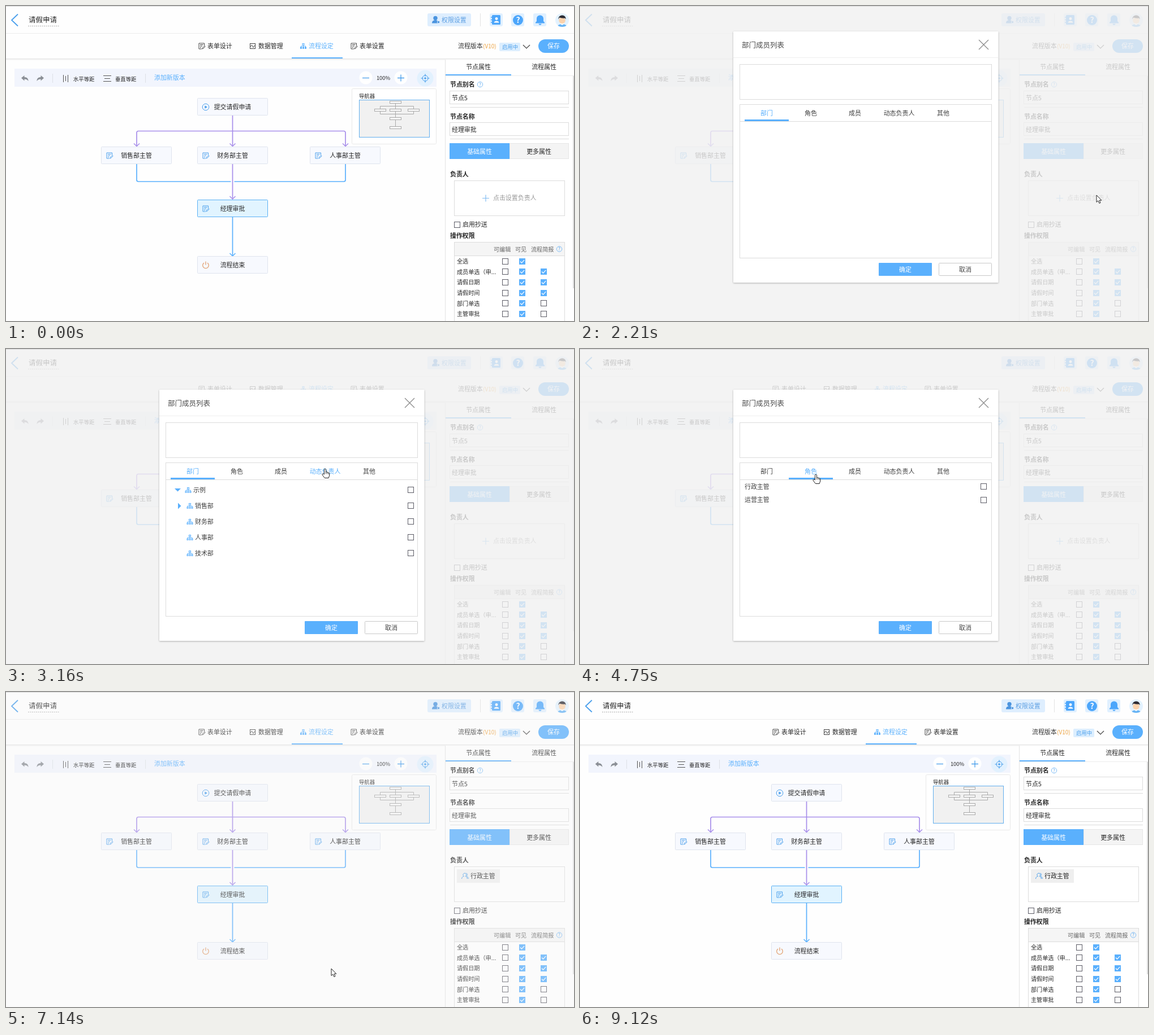
An HTML page for the animation above (9.69 s loop, 1004x558 px).

```html
<!DOCTYPE html>
<html lang="zh-CN">
<head>
<meta charset="utf-8">
<style>
  html, body { margin: 0; width: 100%; height: 100%; overflow: hidden; background: #fff; }
  svg { display: block; width: 1004px; height: 558px; font-family: 'Noto Sans CJK SC', 'Noto Sans CJK', 'Noto Sans', sans-serif; }
  #dialog { --ink: #404040; }
</style>
</head>
<body>
<svg id="stage" viewBox="0 0 1004 558" fill="none"></svg>
<script>
const BLUE = '#5ab0fd', DEEP = '#4a9fec', PURPLE = '#a78eea', INK = '#262626', SOFT = '#404040', EDGE = '#dcdcdc';
const LOOP = 9690, TICK = 79.2;

// ---- drawing helpers, each returns SVG markup ----
const text = (s, x, cy, { size = 10.95, fill = INK, mid = false, bold = false, id = '' } = {}) =>
  `<text x="${x}" y="${cy + size * .38}" font-size="${size}" fill="${fill}"${mid ? ' text-anchor="middle"' : ''}${bold ? ' font-weight="700"' : ''}${id && ` id="${id}"`}>${s}</text>`;
const rect = (x, y, w, h, fill = 'none', stroke = 'none', r = 0, extra = '') =>
  `<rect x="${x}" y="${y}" width="${w}" height="${h}" rx="${r}" fill="${fill}" stroke="${stroke}" ${extra}/>`;
const path = (d, stroke = BLUE, width = 1, fill = 'none') =>
  `<path d="${d}" stroke="${stroke}" stroke-width="${width}" fill="${fill}"/>`;
const fill = (d, color) => path(d, 'none', 0, color);
const circle = (x, y, r, color, stroke = 'none') => `<circle cx="${x}" cy="${y}" r="${r}" fill="${color}" stroke="${stroke}"/>`;
const group = (id, body) => `<g id="${id}">${body}</g>`;
const at = (x, y, body) => `<g transform="translate(${x} ${y})">${body}</g>`;

// Snapped to the pixel grid so that the borders stay sharp.
const checkbox = (cx, cy, on) => at(Math.floor(cx) + .5, Math.floor(cy) + .5, on
  ? rect(-5.5, -5.5, 11, 11, BLUE) + path('M-3.5 0L-1 2.7L3.7-2.7', '#fff', 1.2)
  : rect(-5, -5, 10, 10, '#fff', '#5c5c66'));
const help = (x, y) => circle(x, y, 4.7, 'none', '#7fbdf5') + text('?', x, y, { size: 7.5, fill: DEEP, mid: true });
const docIcon = (x, y, color = DEEP) => at(x, y, path('M4.5-1V-5H-5V5H0M-3-2.5H2.5M-3 0H1M-3 2.5H-1M1 5L1.5 3L5-.5L6 .8L2.5 4.5Z', color));
const orgIcon = (x, y, color = BLUE) => at(x, y,
  rect(-1.5, -4.5, 3, 2.5, 'none', color) + [-4, 0, 4].map(i => rect(i - 1, 2, 2, 2.3, 'none', color)).join('') + path('M0-2V2M-4 2V0H4V2', color, .9));
const peopleIcon = (x, y) => at(x, y, path('M-5.5 5C-5 1.5-3.5 .8-1.5 .5C-4.5-1.5-3-5 0-5C3-5 3.5-1.5 1 .5C3 1 4 2.5 4.3 5M2.5-5C5-4.5 5-1.5 3 .2C5 1 6 2.5 6.3 5', DEEP));

function header() {
  const square = x => rect(x, 13, 23, 23, '#e0f0ff', 'none', 3);
  return path('M0 .5H1004', '#dadada') + path('M0 48.5H1004', '#ececec')
    + path('M21 14.5L10 25L21 35.5', DEEP, 1.8)
    + text('请假申请', 40, 24, { size: 12.5 }) + `<path d="M39 35.5H95" stroke="#aaa" stroke-dasharray="2 1.5"/>`
    + rect(745, 13, 77, 23, '#deeefe', 'none', 3) + text('权限设置', 770, 25, { fill: '#5b9ee2' })
    + circle(759, 21.5, 3.7, '#4b94df') + fill('M753 30.5C753 25.5 757 25 759 25C762 25 764 26 764.5 30.5Z', '#4b94df') + circle(764.5, 28.5, 2.2, '#4b94df', '#deeefe')
    + path('M838.5 13V36', '#e2e2e2')
    + square(855) + rect(859, 16, 15, 17, '#4ca6fb', 'none', 1.5) + path('M857 20H860M857 24.5H860M857 29H860', '#4ca6fb', 1.5)
    + circle(867, 22.5, 2.4, '#fff') + fill('M862.5 29.5C863 25.5 871 25.5 871.5 29.5Z', '#fff')
    + square(893) + circle(905, 25, 9, '#4ca6fb') + text('?', 905, 24.8, { size: 14, fill: '#fff', mid: true, bold: true })
    + square(932) + fill('M936 30.5V29L938 27V22.5C938 18.5 941 16.5 944 16.5C947 16.5 950 18.5 950 22.5V27L952 29V30.5ZM941.5 31.5H946.5C946 34.5 942 34.5 941.5 31.5Z', '#4ca6fb')
    + circle(983, 25, 12, '#e3f2ff') + fill('M975.5 35C977 31 989 31 990.5 35C986 37.5 980 37.5 975.5 35Z', '#68b4f5')
    + fill('M980 29H986V32L983 34L980 32Z', '#fff') + circle(983, 25.5, 5.8, '#fbd3ad') + fill('M976.5 23.5C975.5 14.5 990.5 14 989.5 23.5L988 21.5C984 22 980 21 978 20.5Z', '#2c2c34');
}

function navigation() {
  return rect(0, 93, 1004, 1, '#e3e3e3') + rect(0, 94, 1004, 2, '#f4f4f4')
    + docIcon(346, 71, '#444') + text('表单设计', 356, 71)
    + at(436, 71, rect(-4.5, -4.5, 9, 9, 'none', '#444') + path('M-4 1L-1.5-2L1 2.5L4-1.5', '#444')) + text('数据管理', 446, 71)
    + orgIcon(525.5, 71) + text('流程设定', 535, 71, { fill: BLUE }) + rect(505, 91, 90, 2, BLUE)
    + docIcon(615, 71, '#444') + text('表单设置', 625, 71)
    + text('流程版本', 799, 71, { fill: '#333' }) + text('(V10)', 843, 71, { size: 10, fill: '#eca03c' })
    + rect(872, 65, 37, 15, '#dceefe', 'none', 2) + text('启用中', 877, 72.5, { size: 9.37, fill: DEEP })
    + path('M914 69L920 75L926 69', '#444', 1.2)
    + rect(941, 59, 54, 24, BLUE, 'none', 12) + text('保存', 968, 71, { fill: '#fff', mid: true });
}

function toolbar() {
  const arrow = 'M-1-2C4-2 6 1 6 5C4 2 2 1.5-1 1.5V4.5L-6.5-.5L-1-5Z';
  return rect(15, 111, 746, 32, '#f2f5fd')
    + at(33.5, 128, fill(arrow, '#8b8f96')) + `<g transform="translate(60.5 128) scale(-1 1)">${fill(arrow, '#8b8f96')}</g>`
    + path('M82.5 120V136M246.5 120V136', '#dde0e6')
    + path('M101.5 122V135M105.5 124V133M109.5 122V135', '#555') + text('水平等距', 119, 129, { size: 9.37 })
    + path('M172 123.5H186M174 128.5H184M172 133.5H186', '#555') + text('垂直等距', 193, 129, { size: 9.37 })
    + text('添加新版本', 262, 127, { fill: BLUE })
    + circle(636, 127, 11.5, '#fff') + path('M630 127.5H642', DEEP, 1.3)
    + text('100%', 667, 127.5, { size: 9.37, mid: true })
    + circle(698, 127, 11.5, '#fff') + path('M692 127.5H704M698 121.5V133.5', DEEP, 1.3)
    + circle(741, 128, 14.5, '#e2f1fe') + circle(741, 128, 5, 'none', DEEP) + circle(741, 128, 1.8, DEEP)
    + path('M741 120.5V124.5M741 131.5V135.5M733.5 128H737.5M744.5 128H748.5', DEEP, 1.2);
}

function overview() {
  const minis = [[678, 168], [651, 182], [678, 182], [710, 182], [678, 197], [678, 213]];
  return rect(611.5, 146.5, 149, 98, '#fff', '#e8e8e8', 2) + text('导航器', 624, 159, { size: 9.37 })
    + rect(624.5, 166.5, 124, 66, '#f1f1f1', '#62aeee')
    + path('M688.5 172V213M661.5 182V177.5H720.5V182M661.5 186V191.5H720.5V186', '#aaa')
    + minis.map(([x, y]) => rect(x + .5, y + .5, 20, 4, '#f7f7f7', '#aaa')).join('');
}

function flow() {
  const tip = (x, y, color) => path(`M${x - 5} ${y - 5}L${x} ${y}L${x + 5} ${y - 5}`, color, 1.5);
  const node = (x, y, label, icon, active) => rect(x + .5, y + .5, 124, 30, active ? '#e1f4ff' : '#f7f9fe', active ? '#5ab0f5' : '#dfe4ee', 1)
    + icon(x + 15, y + 16) + text(label, x + 62.5, y + 15.5, { mid: true });
  const play = (x, y) => circle(x, y, 5.8, 'none', DEEP) + fill(`M${x - 1.7} ${y - 2.8}L${x + 3} ${y}L${x - 1.7} ${y + 2.8}Z`, DEEP);
  const power = (x, y) => at(x, y, path('M-3-4A5.3 5.3 0 1 0 3-4M0-6.5V-.5', '#e2a070', 1.3));
  return path('M400.5 194V248M231 248V224.5Q231 221.5 234 221.5H597Q600 221.5 600 224.5V248', PURPLE, 1.7)
    + path('M231 280V308Q231 311 234 311H597Q600 311 600 308V280', BLUE, 1.7)
    + path('M400.5 306V316', '#fff', 6) + path('M400.5 280V342', PURPLE, 1.7) + path('M400.5 374V442', BLUE, 1.7)
    + [231, 400.5, 600].map(x => tip(x, 248.5, PURPLE)).join('') + tip(400.5, 342, PURPLE) + tip(400.5, 443, BLUE)
    + node(338, 163, '提交请假申请', play) + node(168, 249, '销售部主管', docIcon) + node(338, 249, '财务部主管', docIcon)
    + node(537, 249, '人事部主管', docIcon) + node(338, 343, '经理审批', docIcon, true) + node(338, 443, '流程结束', power);
}

function panel() {
  const small = { size: 10.15 }, gray = { size: 10.15, fill: '#666' }, bold = { bold: true };
  const rows = ['全选', '成员单选（申...', '请假日期', '请假时间', '部门单选', '主管审批'];
  return rect(777, 95, 227, 463, '#fff') + path('M776.5 95V558', '#e2e2e2') + path('M777 123.5H1004', '#ececec')
    + text('节点属性', 835, 107.5, { mid: true }) + text('流程属性', 951, 107.5, { mid: true }) + rect(777, 121, 116, 2, BLUE)
    + rect(1002, 124, 2, 376, '#dedede')
    + text('节点别名', 785, 139, bold) + help(838, 139) + rect(784.5, 150.5, 210, 23, '#fff', EDGE) + text('节点5', 788, 162.5)
    + path('M785 179.5H995M785 235.5H995', EDGE)
    + text('节点名称', 785, 195.5, bold) + rect(784.5, 206.5, 210, 23, '#fff', EDGE) + text('经理审批', 788, 219)
    + rect(890.5, 243.5, 104, 27, '#f4f4f4', '#e6e6e6') + rect(784, 243, 106, 28, BLUE)
    + text('基础属性', 837, 257.5, { fill: '#fff', mid: true }) + text('更多属性', 942, 257.5, { mid: true })
    + text('负责人', 785, 297.5, bold) + rect(792.5, 309.5, 195, 62, '#fff', EDGE)
    + group('ownerEmpty', path('M842 340.5H854M848 334.5V346.5', '#82bdf2', 1.2) + text('点击设置负责人', 861, 340, { fill: '#999' }))
    + group('ownerChip', rect(797, 314, 76, 24, '#efefef') + peopleIcon(811, 326) + text('行政主管', 821, 326))
    + checkbox(797.5, 387) + text('启用抄送', 807, 387) + text('操作权限', 785, 407, bold)
    + rect(792.5, 418.5, 195, 150, '#fff', EDGE) + rect(793, 419, 194, 23, '#f5f5f5') + path('M793 442.5H988', EDGE)
    + text('可编辑', 862, 431, gray) + text('可见', 900, 431, gray) + text('流程简报', 928, 431, gray) + help(978, 430.5)
    + rows.map((label, i) => {
        const y = 452 + i * 18.7;
        return text(label, 797, y, small) + checkbox(882.5, y) + checkbox(912.5, y, true) + (i ? checkbox(950, y, i < 4) : '');
      }).join('');
}

const TABS = ['部门', '角色', '成员', '动态负责人', '其他'];

function dialog() {
  const soft = { fill: SOFT };
  const cross = (x, y, r, w) => path(`M${x - r} ${y - r}L${x + r} ${y + r}M${x + r} ${y - r}L${x - r} ${y + r}`, '#8c8c8c', w);
  const tree = ['示例', '销售部', '财务部', '人事部', '技术部'].map((label, i) => {
    const y = 250 + i * 28, x = i ? 334 : 331;
    return orgIcon(x - 9, y) + text(label, x, y, soft) + checkbox(715, y - .5);
  }).join('') + fill('M298 247H309L303.5 252.5ZM304 272.5L309.5 278L304 283.5Z', BLUE);
  return rect(271, 72, 468.5, 445, '#fff', 'none', 1, 'style="filter:drop-shadow(0 1px 1.5px rgba(0,0,0,.28))"')
    + text('部门成员列表', 286, 96, { size: 12.5, fill: '#484848' }) + cross(713.5, 95.5, 8.5, 1.3) + path('M271 118.5H739', '#efefef')
    + rect(282.5, 130.5, 445, 62, '#fff', EDGE) + rect(282.5, 201.5, 445, 272, '#fff', EDGE) + path('M283 231.5H728', EDGE)
    + TABS.map((label, i) => text(label, 330 + i * 78, 216.5, { mid: true, id: 'tab' + i })).join('')
    + rect(291, 228, 78, 3, BLUE, 'none', 0, 'id="underline"')
    + group('tree', tree)
    + group('roles', text('行政主管', 291, 243.5, soft) + checkbox(713, 243.5) + text('运营主管', 291, 267, soft) + checkbox(713, 267))
    + group('picked', checkbox(713, 243.5, true) + rect(287, 135, 99, 24, '#efefef') + peopleIcon(301, 147) + text('行政主管', 311, 147.5, soft) + cross(370.5, 147.5, 5, 1.1))
    + rect(528, 482, 94, 23, BLUE, 'none', 1) + text('确定', 575, 494, { fill: '#fff', mid: true })
    + rect(634.5, 482.5, 93, 22, '#fff', '#c8c8c8', 1) + text('取消', 681, 494, { mid: true, fill: SOFT });
}

const ARROW = path('M0 0V12.5L2.8 9.9L4.9 14.5L7 13.5L5 9.2H8.8Z', '#222', 1, '#fff');
const HAND = path('M-1.5 10V1.2Q0-.8 1.5 1.2V6Q3 4.8 4 6.5Q5.5 5.6 6.3 7.3Q7.5 7 7.7 8.5V12L6.2 16.5H-.7L-5 10.7Q-5.3 8.5-3.3 9Z', '#222', 1, '#fff')
  + path('M1.5 6V9.5M4 6.5V9.5M6.2 7.3V10', '#222', .8);

const $ = id => document.getElementById(id);
$('stage').innerHTML = rect(0, 0, 1004, 558, '#fefefe') + header() + navigation() + toolbar() + flow() + overview() + panel()
  + rect(0, 1, 1004, 557, '#f0f0f0', 'none', 0, 'id="veil"') + group('dialog', dialog()) + group('cursor', group('arrow', ARROW) + group('hand', HAND));

// ---- timeline, in ticks ----
const MOVES = [[2, 830, 575], [15, 905, 350], [21, 913, 335], [30, 913, 335], [37, 600, 222], [40, 564, 212], [44, 564, 212],
  [49, 417, 222], [60, 417, 222], [70, 712, 242], [73, 712, 242], [79, 699, 386], [86, 575, 490], [98, 575, 490],
  [103, 804, 338], [105, 815, 341], [106, 815, 341], [115, 870, 575]];
const HANDS = [[19, 25], [38, 61], [85, 88]];

const clamp = v => Math.max(0, Math.min(1, v));
const ramp = (n, from, to) => clamp((n - from) / (to - from));
const show = (id, on) => $(id).setAttribute('visibility', on ? 'inherit' : 'hidden');

function pointer(n) {
  const i = MOVES.findIndex(m => m[0] >= n);
  if (i < 1) return [-50, -50];
  const [a, x0, y0] = MOVES[i - 1], [b, x1, y1] = MOVES[i], k = ramp(n, a, b);
  return [x0 + (x1 - x0) * k, y0 + (y1 - y0) * k];
}

function render(n) {
  const [x, y] = pointer(n);
  const hand = HANDS.some(([a, b]) => n >= a && n < b);
  $('cursor').setAttribute('transform', `translate(${x} ${y})`);
  show('arrow', !hand);
  show('hand', hand);

  const away = n < 60 ? (1 - ramp(n, 25.86, 29.65)) ** 1.7 : ramp(n, 87, 91) ** 1.7;
  const open = ramp(n, 25, 27) * (1 - ramp(n, 87, 89));
  $('veil').setAttribute('opacity', .8 * ramp(n, 24, 27) * (1 - ramp(n, 88, 91)));
  $('dialog').setAttribute('opacity', open);
  $('dialog').setAttribute('transform', `translate(0 ${Math.round(-111 * away)})`);

  const active = n < 51 ? 0 : 1;
  const hover = y > 201 && y < 231 ? Math.floor((x - 291) / 78) : -1;
  TABS.forEach((_, i) => $('tab' + i).setAttribute('fill', i === active || i === hover ? BLUE : SOFT));
  $('underline').setAttribute('x', 291 + 78 * active);
  show('tree', n >= 31 && !active);
  show('roles', n >= 53);
  show('picked', n >= 72);
  show('ownerEmpty', n < 88);
  show('ownerChip', n >= 88);
}

function loop() {
  render(Math.floor((performance.now() % LOOP + 10) / TICK));
  requestAnimationFrame(loop);
}
loop();
</script>
</body>
</html>
```
